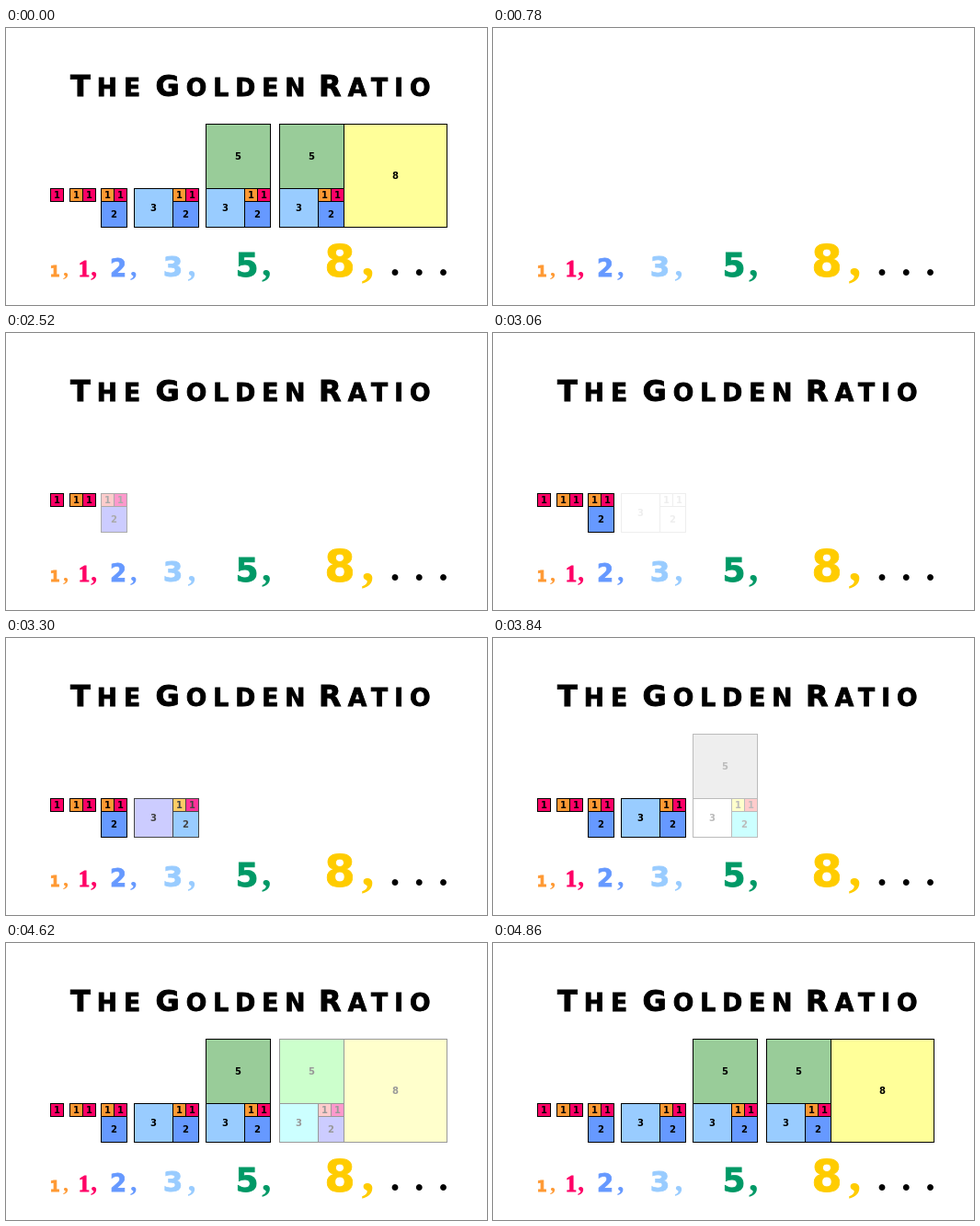
Animation of 523x301 px, one loop 5.34 s. Source, as an HTML page with a canvas:

```html
<!DOCTYPE html>
<html lang="en">
<head>
<meta charset="utf-8">
<title>The Golden Ratio</title>
<style>
  html, body { margin: 0; width: 100%; height: 100%; overflow: hidden; background: #fff; }
  canvas { display: block; }
</style>
</head>
<body>
<canvas id="stage" width="523" height="301"></canvas>
<script>
const ctx = document.getElementById('stage').getContext('2d');
const LOOP = 5340, STEP = 60, CLEAR = 780, TITLE_IN = 1440;
const SANS = '"DejaVu Sans", Verdana, sans-serif';
const SERIF = '"Liberation Serif", "Times New Roman", serif';

const ORANGE = [255, 153, 51], PINK = [255, 0, 102], BLUE = [102, 153, 255];
const SKY = [153, 204, 255], GREEN = [153, 204, 153], YELLOW = [255, 255, 153];

// Cells: value, x, y, fill. A value of n makes a square of 14n pixels.
const ones = x => [[1, x, 174, ORANGE], [1, x + 14, 174, PINK]];
const two = x => [...ones(x), [2, x, 188, BLUE]];
const three = x => [[3, x, 174, SKY], ...two(x + 42)];
const five = x => [[5, x, 104, GREEN], ...three(x)];
const groups = [
  { from: 1460, to: 1800, cells: [[1, 48, 174, PINK]] },
  { from: 1810, to: 2340, cells: ones(69) },
  { from: 2340, to: 2820, cells: two(103) },
  { from: 2990, to: 3470, cells: three(139) },
  { from: 3610, to: 4335, cells: five(217) },
  { from: 4450, to: 4860, cells: [...five(297), [8, 367, 104, YELLOW]] }
];

// Digit, centre x, size, colour, comma x, font
const series = [
  ['1', 53, 16, '#ff9933', 62, SANS],
  ['1', 85, 25, '#ff0066', 92, SERIF],
  ['2', 122, 26, '#6699ff', 135, SANS],
  ['3', 181.5, 31, '#99ccff', 197.5, SANS],
  ['5', 262, 36, '#009966', 278, SANS],
  ['8', 363, 48, '#ffcc00', 386.5, SANS]
];

function text(str, x, y, font, color, align = 'left') {
  ctx.font = font;
  ctx.fillStyle = color;
  ctx.textAlign = align;
  ctx.fillText(str, x, y);
}

// Display lettering, thickened by a fine outline
function heavy(str, x, y, font, color, align) {
  text(str, x, y, font, color, align);
  ctx.strokeStyle = color;
  ctx.lineWidth = 0.8;
  ctx.strokeText(str, x, y);
}

// Blend with white, then snap to a web-safe colour or a grey
function fade(rgb, a) {
  const mix = rgb.map(c => 255 + (c - 255) * a);
  const isGrey = Math.max(...mix) - Math.min(...mix) < 16;
  const mean = (mix[0] + mix[1] + mix[2]) / 3;
  const out = isGrey
    ? Array(3).fill(Math.round(mean / 17) * 17)
    : mix.map(c => Math.round(c / 51) * 51);
  return `rgb(${out.join()})`;
}

function opacity(group, t) {
  if (t < CLEAR) return 1;
  const u = Math.min(1, Math.max(0, (t - group.from) / (group.to - group.from)));
  return u * u * (3 - 2 * u);
}

function drawGroup(group, t) {
  const a = opacity(group, t);
  if (!a) return;
  const ink = fade([0, 0, 0], a);
  ctx.lineWidth = 1;
  for (const [n, x, y, rgb] of group.cells) {
    const size = 14 * n;
    ctx.fillStyle = fade(rgb, a);
    ctx.fillRect(x, y, size, size);
    ctx.strokeStyle = ink;
    ctx.strokeRect(x + 0.5, y + 0.5, size, size);
    text(n, x + size / 2 + 0.5, y + size / 2 + 4, `bold 10px ${SANS}`, ink, 'center');
  }
}

function smallCaps(word, x) {
  const y = 73.5;
  ctx.letterSpacing = '7px';
  heavy(word[0], x, y, `bold 32px ${SANS}`, '#000');
  const next = x + ctx.measureText(word[0]).width;
  heavy(word.slice(1).toUpperCase(), next, y, `bold 26.5px ${SANS}`, '#000');
  ctx.letterSpacing = '0px';
}

function drawSeries() {
  for (const [digit, x, size, color, commaX, face] of series) {
    heavy(digit, x, 269.5, `bold ${size}px ${face}`, color, 'center');
    text(',', commaX, 269, `bold ${Math.max(24, size * 1.16)}px ${SERIF}`, color);
  }
  for (let i = 0; i < 3; i++) {
    text('.', 423 + 26.3 * i, 269, `bold 42px ${SERIF}`, '#000', 'center');
  }
}

function draw(t) {
  ctx.fillStyle = '#fff';
  ctx.fillRect(0, 0, 523, 301);
  drawSeries();
  if (t < CLEAR || t >= TITLE_IN) {
    smallCaps('The', 70);
    smallCaps('Golden', 162.5);
    smallCaps('Ratio', 340);
  }
  groups.forEach(g => drawGroup(g, t));
}

const start = performance.now();
function tick() {
  const t = (performance.now() - start) % LOOP;
  draw(Math.floor(t / STEP) * STEP);
  requestAnimationFrame(tick);
}
tick();
</script>
</body>
</html>
```
